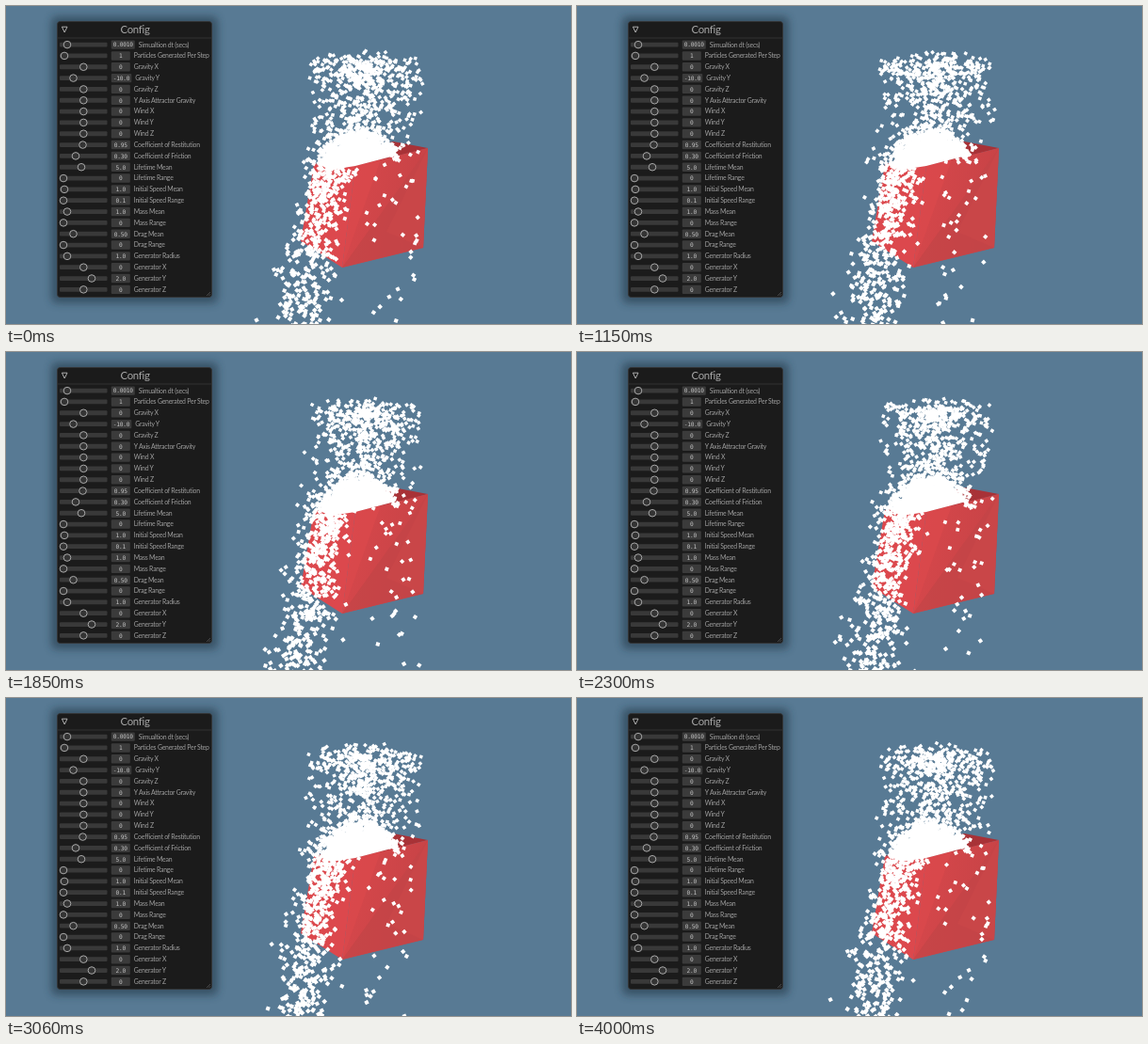
An HTML page with a canvas that plays this animation: 600x338 px, repeating every 4030 ms.

```html
<!DOCTYPE html>
<html lang="en">
<head>
<meta charset="utf-8">
<title>Particle config</title>
<style>
  html, body { margin: 0; width: 100%; height: 100%; overflow: hidden; background: #587a94; }
  svg, canvas { position: absolute; left: 0; top: 0; width: 600px; height: 338px; }
  .label { font: 6.9px Lato, sans-serif; letter-spacing: -.23px; fill: #a0a0a0; }
  .value { font: 6.2px "DejaVu Sans Mono", monospace; letter-spacing: -.22px; fill: #c4c4c4; text-anchor: middle; }
  .title { font: 11.4px Lato, sans-serif; letter-spacing: -.3px; fill: #a8a8a8; text-anchor: middle; }
</style>
</head>
<body>
<svg viewBox="0 0 600 338">
  <defs>
    <filter id="blur" x="-20%" y="-20%" width="140%" height="140%"><feGaussianBlur stdDeviation="4.5"/></filter>
    <linearGradient id="front" x1="0" y1="0" x2="1" y2="0.3">
      <stop offset="0" stop-color="#d9484c"/><stop offset="1" stop-color="#c74346"/>
    </linearGradient>
  </defs>
  <rect width="600" height="338" fill="#587a94"/>
  <g stroke-linejoin="round">
    <path d="M327 168L411 144L448 151L371 171Z" fill="#a83237"/>
    <path d="M327 168L371 170L357 278L313 250Z" fill="#dc484d"/>
    <path d="M371 170L448 151L443 257L357 278Z" fill="url(#front)"/>
    <path d="M448 151L443 257L357 278Z" fill="#c34447" opacity=".75"/>
    <path d="M448 151L443 257L404 240Z" fill="#cb4649" opacity=".8"/>
    <path d="M371 170L398 163L357 278Z" fill="#de4a4e" opacity=".6"/>
  </g>
  <rect x="48" y="11" width="177" height="305" rx="6" fill="#1c3040" opacity=".55" filter="url(#blur)"/>
  <rect x="54.5" y="16.5" width="164" height="293" rx="3" fill="#1b1b1b" stroke="#353535" stroke-width=".8"/>
  <path d="M55 34H218" stroke="#3a3a3a" stroke-width=".7"/>
  <path d="M59.4 22.2H65L62.2 28Z" fill="none" stroke="#bbb" stroke-width=".9"/>
  <path d="M213 308L217 304M215.2 308L217 306.2" stroke="#777" stroke-width=".5"/>
  <text class="title" x="137" y="28.6">Config</text>
  <g id="rows"></g>
</svg>
<canvas id="view"></canvas>
<script>
const LOOP = 4030;
const STEP = 30;

const settings = [
  ["Simualtion dt (secs)", "0.0010", 65], ["Particles Generated Per Step", "1", 62],
  ["Gravity X", "0", 82.3], ["Gravity Y", "-10.0", 71.5], ["Gravity Z", "0", 82.3],
  ["Y Axis Attractor Gravity", "0", 82.3],
  ["Wind X", "0", 82.3], ["Wind Y", "0", 82.3], ["Wind Z", "0", 82.3],
  ["Coefficient of Restitution", "0.95", 81.5], ["Coefficient of Friction", "0.30", 74],
  ["Lifetime Mean", "5.0", 80], ["Lifetime Range", "0", 61],
  ["Initial Speed Mean", "1.0", 62], ["Initial Speed Range", "0.1", 61],
  ["Mass Mean", "1.0", 65], ["Mass Range", "0", 61],
  ["Drag Mean", "0.50", 71.5], ["Drag Range", "0", 61],
  ["Generator Radius", "1.0", 65],
  ["Generator X", "0", 82.3], ["Generator Y", "2.0", 91], ["Generator Z", "0", 82.3]
];

function settingRow([label, value, knob], i) {
  const y = 41.1 + i * 11.83;
  const width = Math.max(20, value.length * 3.5 + 4);
  return `<rect x="57" y="${y - 2.4}" width="50.5" height="4.8" rx="1" fill="#393939"/>
    <circle cx="${knob}" cy="${y}" r="3.8" fill="#343434" stroke="#b5b5b5" stroke-width=".9"/>
    <rect x="111.8" y="${y - 4.7}" width="${width}" height="9.4" rx="1" fill="#3b3b3b"/>
    <text class="value" x="${111.8 + width / 2}" y="${y + 2.3}">${value}</text>
    <text class="label" x="${115.8 + width}" y="${y + 2.4}">${label}</text>`;
}
document.getElementById("rows").innerHTML = settings.map(settingRow).join("");

const canvas = document.getElementById("view");
const ratio = window.devicePixelRatio || 1;
canvas.width = 600 * ratio;
canvas.height = 338 * ratio;
const ctx = canvas.getContext("2d");
ctx.scale(ratio, ratio);

// Stateless random number in [0, 1) for particle id and channel.
function rand(id, channel) {
  const v = Math.sin(id * 12.9898 + channel * 78.233) * 43758.5453;
  return v - Math.floor(v);
}
const bell = (id, c) => rand(id, c) + rand(id, c + 1) + rand(id, c + 2) - 1.5;
const moundTop = x => 131 + 26 * ((x - 377) / 43) ** 2;

function square(x, y, angle) {
  if (y > 344) return;
  const half = (3.3 + y / 450) / 2;
  const c = Math.cos(angle) * half, s = Math.sin(angle) * half;
  ctx.moveTo(x + c - s, y + s + c);
  ctx.lineTo(x - s - c, y + c - s);
  ctx.lineTo(x - c + s, y - s - c);
  ctx.lineTo(x + s + c, y - c + s);
  ctx.closePath();
}

// Each group: particle count, lives per loop and position at age t (seconds).
const groups = [
  { count: 590, lives: 7, place(id, t) {
    const r = rand(id, 1) ** 0.9, a = rand(id, 2) * Math.PI * 2;
    return [
      381 + 61 * r * Math.cos(a) + (rand(id, 3) - 0.5) * 18 * t,
      62 + 14 * r * Math.sin(a) + (rand(id, 4) - 0.55) * 60 * t + 255 * t * t
    ];
  } },
  { count: 190, lives: 6, place(id, t, u) {
    const x = 371 + bell(id, 1) * 46;
    return [
      x + (rand(id, 5) - 0.55) * 34 * u,
      Math.min(moundTop(x), 158) + 10 - (10 + 95 * rand(id, 6) ** 2) * u * (1 - u)
    ];
  } },
  { count: 230, lives: 4, place(id, t, u) {
    const x = 336 + rand(id, 1) * 78;
    return [
      x + (x - 380) * 0.12 * u,
      moundTop(x) + rand(id, 2) * 14 + 4 * u
    ];
  } },
  { count: 490, lives: 5, place(id, t) {
    const start = 346 + bell(id, 1) * 22;
    return [
      start - (44 - bell(id, 5) * 30) * t,
      162 + rand(id, 8) * 14 + (100 + bell(id, 9) * 24) * t + 160 * t * t
    ];
  } },
  { count: 32, lives: 5, place(id, t) {
    return [
      384 + rand(id, 1) * 54 + (rand(id, 2) - 0.5) * 14 * t,
      162 + rand(id, 3) * 24 + (90 + rand(id, 4) * 30) * t + 160 * t * t
    ];
  } }
];

function drawMound() {
  ctx.moveTo(333, 169);
  for (let x = 337; x <= 413; x += 4) ctx.lineTo(x, moundTop(x) + 10);
  ctx.lineTo(417, 158);
  ctx.lineTo(371, 170);
  ctx.lineTo(345, 174);
  ctx.closePath();
}

function drawGroup({ count, lives, place }, time, offset) {
  const life = LOOP / lives;
  for (let i = 0; i < count; i++) {
    const turns = time / life + i / count;
    const cycle = Math.floor(turns) % lives;
    const u = turns % 1;
    const id = offset + i + cycle * 1000;
    const [x, y] = place(id, u * life / 1000, u);
    square(x, y, 0.25 + rand(id, 20) * 0.9);
  }
}

function render(time) {
  ctx.clearRect(0, 0, 600, 338);
  ctx.fillStyle = "#fff";
  ctx.beginPath();
  drawMound();
  ctx.fill();
  groups.forEach((group, i) => {
    ctx.beginPath();
    drawGroup(group, time, 1 + i * 10000);
    ctx.fill();
  });
}

const started = performance.now();
function tick() {
  const time = (performance.now() - started) % LOOP;
  render(Math.floor(time / STEP) * STEP);
  requestAnimationFrame(tick);
}
tick();
</script>
</body>
</html>
```
